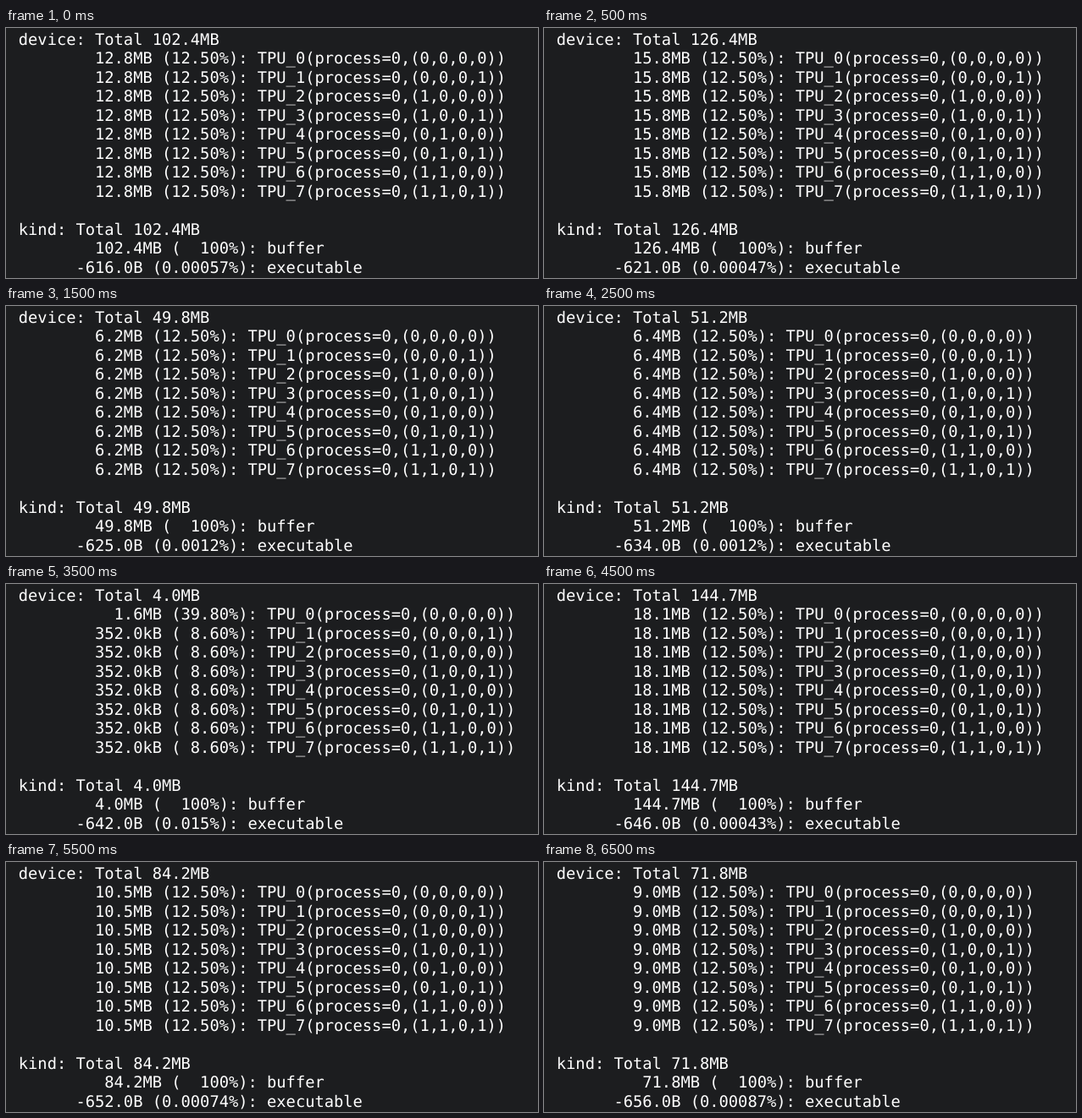
Write an HTML page that moves like this. It is 628x296 px and loops after 8 s.

```html
<!DOCTYPE html>
<html lang="en">
<head>
<meta charset="utf-8">
<style>
html, body { margin: 0; height: 100%; overflow: hidden; background: #1c1d1f; }
svg { display: block; width: 628px; height: 296px; }
text {
  font: 18.74px "DejaVu Sans Mono", Menlo, monospace;
  fill: #fff;
  white-space: pre;
  text-rendering: geometricPrecision;
  font-variant-ligatures: none;
}
</style>
</head>
<body>
<svg viewBox="0 0 628 296"></svg>
<script>
const LOOP = 8000, LEFT = 14.8, BASELINE = 20, PITCH = 22.5;
const EVEN = "(12.50%)";

// start time, total, executable size and share, device use, first device use if different
const reports = [
  [0, "102.4MB", "-616.0B (0.00057%)", `12.8MB ${EVEN}`],
  [500, "126.4MB", "-621.0B (0.00047%)", `15.8MB ${EVEN}`],
  [1500, "49.8MB", "-625.0B (0.0012%)", `6.2MB ${EVEN}`],
  [2500, "51.2MB", "-634.0B (0.0012%)", `6.4MB ${EVEN}`],
  [3500, "4.0MB", "-642.0B (0.015%)", "352.0kB ( 8.60%)", "1.6MB (39.80%)"],
  [4500, "144.7MB", "-646.0B (0.00043%)", `18.1MB ${EVEN}`],
  [5500, "84.2MB", "-652.0B (0.00074%)", `10.5MB ${EVEN}`],
  [6500, "71.8MB", "-656.0B (0.00087%)", `9.0MB ${EVEN}`],
];

const svg = document.querySelector("svg");
const rows = Array.from({ length: 13 }, (_, i) => {
  const row = document.createElementNS("http://www.w3.org/2000/svg", "text");
  row.setAttribute("x", LEFT);
  row.setAttribute("y", Math.floor(BASELINE + i * PITCH));
  return svg.appendChild(row);
});

function lines([, total, executable, use, firstUse = use]) {
  const devices = Array.from({ length: 8 }, (_, i) => {
    const share = (i ? use : firstUse).padStart(use.length);
    const coords = [i >> 1 & 1, i >> 2, 0, i & 1];
    return `        ${share}: TPU_${i}(process=0,(${coords}))`;
  });
  const buffer = `${total} (  100%)`.padStart(executable.length);
  return [
    `device: Total ${total}`,
    ...devices,
    "",
    `kind: Total ${total}`,
    `      ${buffer}: buffer`,
    `      ${executable}: executable`,
  ];
}

let shown;
function draw() {
  const time = performance.now() % LOOP;
  const report = reports.findLast(([start]) => start <= time);
  if (report !== shown) {
    shown = report;
    lines(report).forEach((line, i) => rows[i].textContent = line);
  }
  requestAnimationFrame(draw);
}
draw();
</script>
</body>
</html>
```
